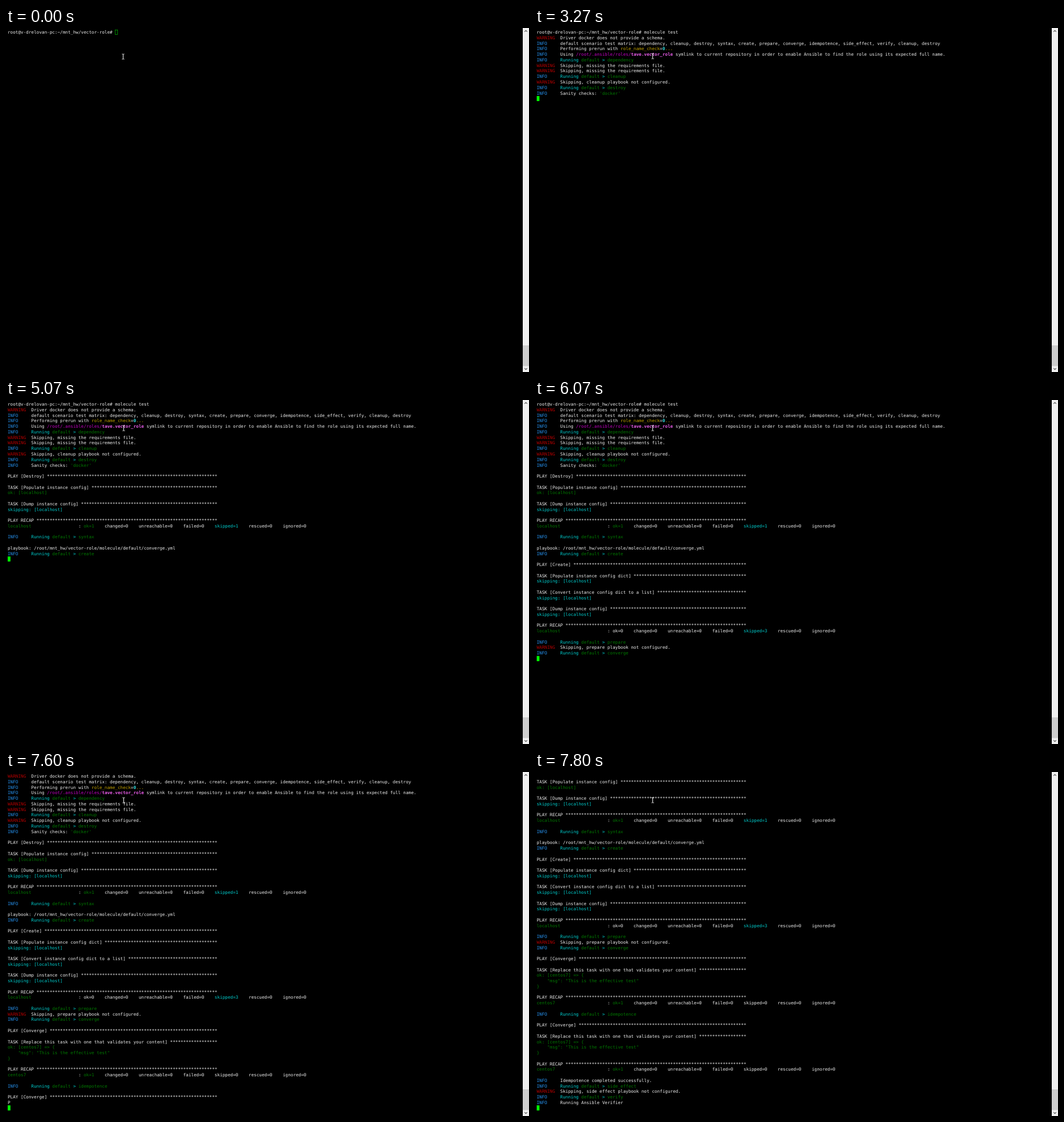
An HTML page that plays this animation: 922x607 px, repeating every 8 s.

```html
<!DOCTYPE html>
<html lang="en">
<head>
<meta charset="utf-8">
<title>Terminal</title>
<style>
  html, body { margin: 0; width: 100%; height: 100%; overflow: hidden; background: #000; }
  #screen {
    position: absolute; left: 2.8px; top: 2.85px; width: 1767px; height: 1159px;
    overflow: hidden; transform: scale(.5135); transform-origin: 0 0;
    font: 14.95px/19px "DejaVu Sans Mono", monospace;
    text-rendering: geometricPrecision; color: #ededed;
  }
  #page { position: absolute; left: 0; top: 0; }
  #page div { height: 19px; white-space: pre; }
  #page #caret { position: absolute; width: 9px; height: 17px; box-sizing: border-box; border: 1.6px solid #0f0; }
  .r { color: #b40000 } .b { color: #2796f5 } .g { color: #007800 } .c { color: #00cdcd }
  .m { color: #c000c0 } .y { color: #c0a000 }
  .M { color: #e85ce8; font-weight: bold } .C { color: #30e0e0; font-weight: bold }
  svg { position: absolute; left: 0; top: 0; }
</style>
</head>
<body>
<div id="screen"><div id="page"></div></div>
<svg width="922" height="607" fill="none">
  <rect x="911" width="11" height="607" fill="#f0f0f0"/>
  <rect x="911" y="560" width="11" height="36.5" fill="#cdcdcd"/>
  <path d="M914.2 6.6L916.5 4.3L918.8 6.6M914.2 600.4L916.5 602.7L918.8 600.4" stroke="#505050" stroke-width="1.2"/>
  <path id="mouse" d="M-2 -4.5H-.6L0 -4L.6 -4.5H2M0 -4V4M-2 4.5H-.6L0 4L.6 4.5H2" stroke="#fff"/>
</svg>
<script>
const LOOP = 8000, ROW = 19, COL = 9, VISIBLE = 61;
const PROMPT = 'root@v-drelovan-pc:~/mnt_hw/vector-role# ', COMMAND = 'molecule test';

const tint = (cls, text) => `<span class="${cls}">${text}</span>`;
const info = text => tint('b', 'INFO') + '     ' + text;
const warn = text => tint('r', 'WARNING') + '  ' + text;
const run = stage => info(`${tint('c', 'Running')} ${tint('g', 'default')} ${tint('c', '&gt;')} ${tint('g', stage)}`);
const head = text => (text + ' ').padEnd(80, '*');
const play = name => ['', head(`PLAY [${name}]`)];
const task = (name, ...out) => ['', head(`TASK [${name}]`), ...out];
const recap = (host, ok, skipped) => ['', head('PLAY RECAP'),
  [tint('g', host.padEnd(27)) + ': ' + (ok ? tint('g', 'ok=' + ok) : 'ok=0'),
   'changed=0', 'unreachable=0', 'failed=0',
   skipped ? tint('c', 'skipped=' + skipped) : 'skipped=0',
   'rescued=0', 'ignored=0'].join('    '), ''];

const skip = tint('c', 'skipping: [localhost]');
const missing = warn('Skipping, missing the requirements file.');
const converge = [
  ...play('Converge'),
  ...task('Replace this task with one that validates your content',
    tint('g', 'ok: [centos7] =&gt; {'),
    tint('g', '    "msg": "This is the effective test"'),
    tint('g', '}')),
  ...recap('centos7', 1, 0)
];

const lines = [
  '',
  warn('Driver docker does not provide a schema.'),
  info('default scenario test matrix: dependency, cleanup, destroy, syntax, create, prepare, converge, idempotence, side_effect, verify, cleanup, destroy'),
  info('Performing prerun with ' + tint('y', 'role_name_check') + '=' + tint('C', '0') + tint('y', '...')),
  info('Using ' + tint('m', '/root/.ansible/roles/') + tint('M', 'tave.vector_role') +
    ' symlink to current repository in order to enable Ansible to find the role using its expected full name.'),
  run('dependency'), missing, missing,
  run('cleanup'),
  warn('Skipping, cleanup playbook not configured.'),
  run('destroy'),
  info('Sanity checks: ' + tint('g', "'docker'")),
  ...play('Destroy'),
  ...task('Populate instance config', tint('g', 'ok: [localhost]')),
  ...task('Dump instance config', skip),
  ...recap('localhost', 1, 1),
  run('syntax'),
  '',
  'playbook: /root/mnt_hw/vector-role/molecule/default/converge.yml',
  run('create'),
  ...play('Create'),
  ...task('Populate instance config dict', skip),
  ...task('Convert instance config dict to a list', skip),
  ...task('Dump instance config', skip),
  ...recap('localhost', 0, 3),
  run('prepare'),
  warn('Skipping, prepare playbook not configured.'),
  run('converge'),
  ...converge,
  run('idempotence'),
  ...converge,
  info('Idempotence completed successfully.'),
  run('side_effect'),
  warn('Skipping, side effect playbook not configured.'),
  run('verify'),
  info('Running Ansible Verifier')
];

// [time, finished rows, typed characters]
const steps = [
  [0, 0, 0], [70, 0, 0], [200, 0, 0], [670, 0, 5], [1130, 0, 13], [1530, 1, 13],
  [2330, 5, 13], [2870, 11, 13], [3270, 12, 13],
  [4000, 16, 13], [4070, 19, 13], [4130, 24, 13], [4200, 25, 13],
  [4930, 27, 13], [5070, 28, 13],
  [5800, 32, 13], [5870, 38, 13], [5930, 43, 13], [6070, 46, 13],
  [6870, 50, 13], [7000, 58, 13],
  [7600, 61, 13], [7670, 69, 13], [7800, 74, 13]
];

const page = document.getElementById('page');
const mouse = document.getElementById('mouse');
const rowEls = lines.map(html => {
  const el = document.createElement('div');
  el.innerHTML = html;
  page.append(el);
  return el;
});
const caret = document.createElement('div');
caret.id = 'caret';
page.append(caret);

let shown = null;
function draw(now) {
  const t = now % LOOP;
  const step = steps.findLast(s => s[0] <= t);
  if (step !== shown) {
    shown = step;
    const [time, rows, typed] = step;
    rowEls[0].textContent = PROMPT + COMMAND.slice(0, typed);
    rowEls[60].textContent = rows === 61 ? 'P' : '';   // line still being written
    rowEls.forEach((el, i) => el.style.visibility = i < Math.max(rows, 1) ? 'visible' : 'hidden');
    caret.style.left = (rows ? 0 : (PROMPT.length + typed) * COL) + 'px';
    caret.style.top = rows * ROW + 'px';
    caret.style.background = time < 200 ? 'none' : '#0f0';
    page.style.top = -Math.max(0, rows - VISIBLE + 1) * ROW + 'px';
    mouse.setAttribute('transform', time < 70 ? 'translate(206.5 50.5)' : 'translate(207.5 49.8)');
  }
  requestAnimationFrame(() => draw(performance.now() - start));
}
const start = performance.now();
draw(0);
</script>
</body>
</html>
```
